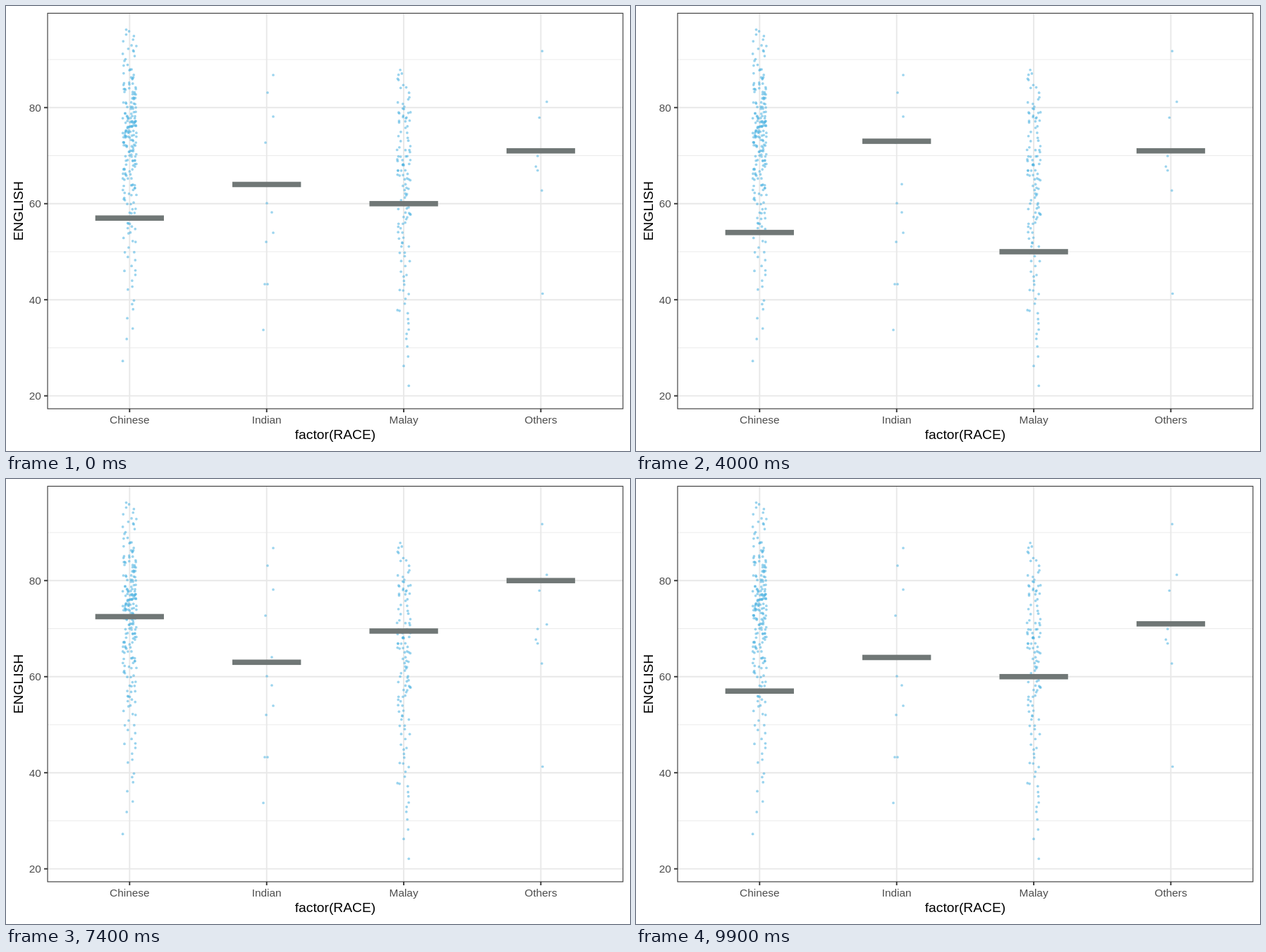
An HTML page that plays this animation: 885 px wide and 632 px high, repeating every 10000 ms.

```html
<!DOCTYPE html>
<html lang="en">
<head>
<meta charset="utf-8">
<title>English scores by group</title>
<style>
html, body { margin: 0; width: 100%; height: 100%; overflow: hidden; background: #fff; }
svg { display: block; }
text { font: 15.4px "Liberation Sans", Arial, sans-serif; fill: #4d4d4d; }
.title { font-size: 19.25px; fill: #000; text-anchor: middle; }
</style>
</head>
<body>
<svg id="plot" width="885" height="632" viewBox="0 0 885 632"></svg>
<script>
const svg = document.getElementById('plot');
const groups = ['Chinese', 'Indian', 'Malay', 'Others'];
const LEFT = 59, TOP = 10.3, RIGHT = 875, BOTTOM = 572;
const BAR_W = 97.3, BAR_H = 7.6;
const xAt = i => 175.3 + 194.4 * i;
const yAt = v => 280.75 - (v - 60) * 6.8225;

function add(tag, attrs, text) {
  const el = document.createElementNS('http://www.w3.org/2000/svg', tag);
  for (const k in attrs) el.setAttribute(k, attrs[k]);
  if (text) el.textContent = text;
  svg.append(el);
  return el;
}
const line = (x1, y1, x2, y2, stroke, width) =>
  add('line', { x1, y1, x2, y2, stroke, 'stroke-width': width });
const dot = (cx, cy) => add('circle', { cx, cy, r: 1.85, fill: '#48b1e0', 'fill-opacity': .55 });

// Grid
for (let v = 30; v <= 90; v += 20) line(LEFT, yAt(v), RIGHT, yAt(v), '#ebebeb', 1);
for (let v = 20; v <= 80; v += 20) line(LEFT, yAt(v), RIGHT, yAt(v), '#e8e8e8', 1.9);
groups.forEach((_, i) => line(xAt(i), TOP, xAt(i), BOTTOM, '#e8e8e8', 1.9));

// Small groups, as x,y pairs
const indian = [379,98, 371,123, 379,157, 368,194, 377,253, 370,280, 377,293, 379,322,
  369,335, 367,395, 371,395, 365,460];
const others = [760.5,64, 767,136, 756.5,158.5, 767,206.5, 754,213, 751.5,228, 754,233.5,
  760,262, 761,408.5];
for (const pts of [indian, others])
  for (let i = 0; i < pts.length; i += 2) dot(pts[i], pts[i + 1]);

// Large groups: whole scores spread along their deciles, with random jitter
let seed = 7;
const jitter = size => {
  seed = (seed * 16807) % 2147483647;
  return (seed / 2147483647 * 2 - 1) * size;
};
function crowd(group, count, deciles) {
  for (let i = 0; i < count; i++) {
    const pos = (i + .02) / (count - 1) * 10;
    const k = Math.min(9, Math.floor(pos));
    const part = k ? Math.min(1, pos - k) : Math.sqrt(pos); // thin lower tail
    const score = Math.round(deciles[k] + (deciles[k + 1] - deciles[k]) * part);
    dot(xAt(group) + jitter(9.7), yAt(score + jitter(.3)));
  }
}
crowd(0, 226, [26, 54, 62, 67, 71, 74, 76, 78, 82, 86, 96]);
crowd(2, 131, [21, 40, 50, 56, 60, 65, 68, 71, 77, 80, 88]);

// Sampled score of each group in every draw
const draws = [
  [57,73,71,75,62,73,76,85,72,79,54,74,71,82,73,78,72,77,67,78,73,54,79,67,76],
  [64,87,58,60,54,83,60,34,60,43,73,58,64,83,43,60,64,54,83,43,43,73,83,58,87],
  [60,68,58,66,64,41,21,66,70,58,50,39,31,43,66,58,64,53,66,73,68,56,66,24,67],
  [71,78,41,68,68,71,68,68,70,70,71,81,68,81,70,68,41,71,68,92,63,78,70,68,78]
];
const bars = groups.map((_, i) =>
  add('rect', { x: xAt(i) - BAR_W / 2, width: BAR_W, height: BAR_H, fill: '#707776' }));

// Frame, ticks and labels
add('rect', { x: LEFT, y: TOP, width: RIGHT - LEFT, height: BOTTOM - TOP,
  fill: 'none', stroke: '#333', 'stroke-width': 1.1 });
for (let v = 20; v <= 80; v += 20) {
  line(LEFT - 5, yAt(v), LEFT, yAt(v), '#333', 1.9);
  add('text', { x: 49.8, y: yAt(v) + 5.5, 'text-anchor': 'end' }, v);
}
groups.forEach((name, i) => {
  line(xAt(i), BOTTOM, xAt(i), BOTTOM + 5, '#333', 1.9);
  add('text', { x: xAt(i), y: 592.6, 'text-anchor': 'middle' }, name);
});
add('text', { x: 467, y: 614.7, class: 'title' }, 'factor(RACE)');
add('text', { class: 'title', transform: 'translate(23.5 291) rotate(-90)' }, 'ENGLISH');

// Four 100 ms steps per draw, the last halfway to the next; one step is skipped at 5 s
function render(ms) {
  let step = Math.floor(ms / 100) % 100;
  if (step >= 50) step++;
  const now = Math.floor(step / 4) % 25;
  const next = step % 4 === 3 ? (now + 1) % 25 : now;
  bars.forEach((bar, i) =>
    bar.setAttribute('y', yAt((draws[i][now] + draws[i][next]) / 2) - BAR_H / 2));
}
const start = performance.now();
function tick() {
  render(performance.now() - start);
  requestAnimationFrame(tick);
}
tick();
</script>
</body>
</html>
```
